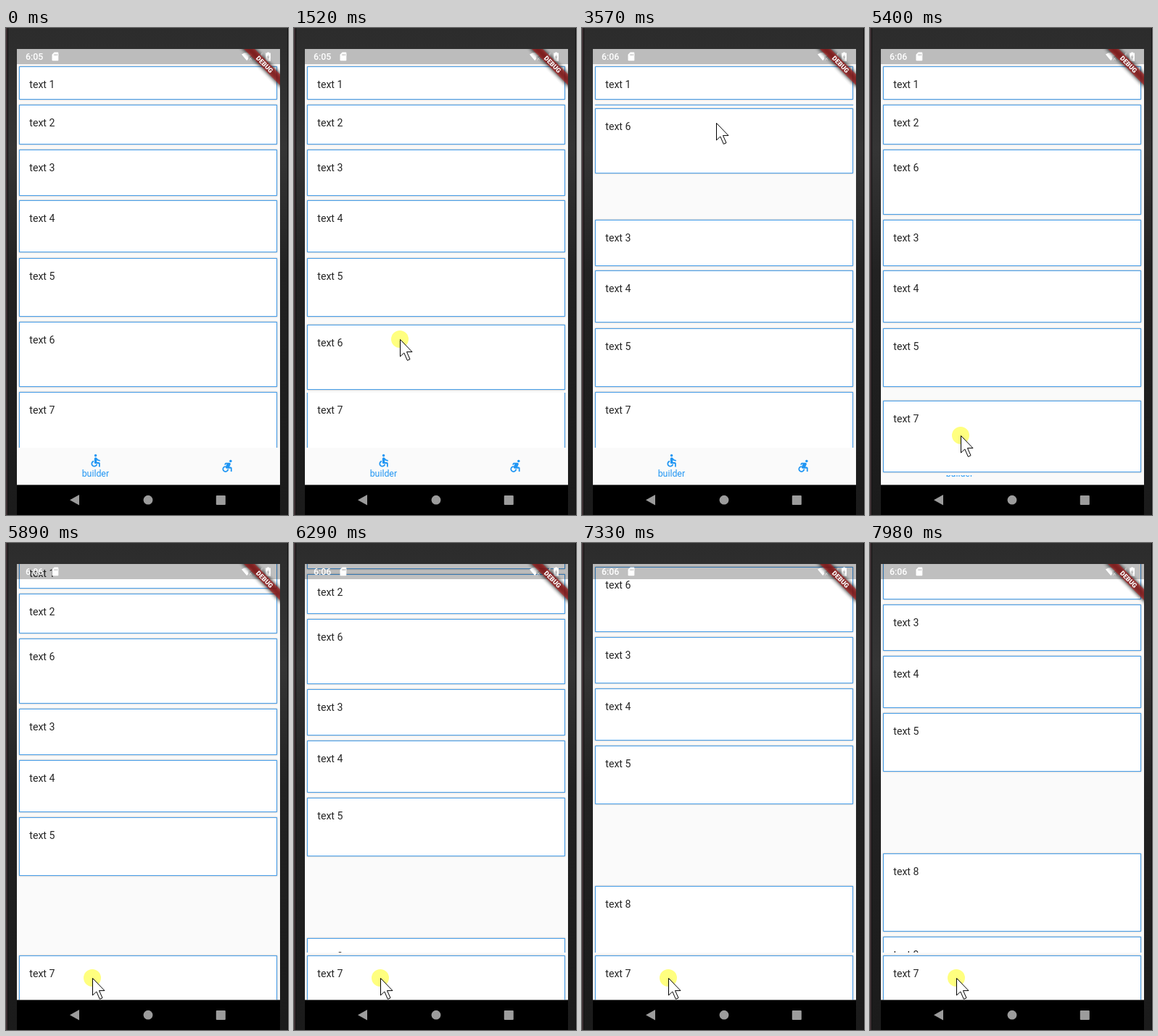
Recreate the animation shown at these times as an HTML page. Size 389 by 673 pixels, loop 8000 ms.

```html
<!DOCTYPE html>
<html lang="en">
<head>
<meta charset="utf-8">
<title>Reorderable list</title>
<style>
  html, body { margin: 0; width: 100%; height: 100%; overflow: hidden; background: #1e1e1e; }
  svg { display: block; width: 100vw; height: 100vh; font-family: Roboto, "Liberation Sans", sans-serif; }
  .face { fill: #fff; filter: drop-shadow(0 .9px .8px rgba(0, 0, 0, .32)); }
  .edge { fill: none; stroke: #489fea; }
  .label { font-size: 14.1px; fill: #262626; }
</style>
</head>
<body>
<svg id="stage" viewBox="0 0 389 673">
  <defs>
    <linearGradient id="bezel" x2="0" y2="1">
      <stop offset="0" stop-color="#2c2c2c"/>
      <stop offset=".25" stop-color="#353535"/>
      <stop offset=".5" stop-color="#222"/>
      <stop offset="1" stop-color="#1b1b1b"/>
    </linearGradient>
    <clipPath id="screen"><rect x="15" y="29" width="363" height="602.5"/></clipPath>
    <clipPath id="viewport"><rect x="15" y="29" width="363" height="551"/></clipPath>
    <filter id="blur" x="-30%" y="-100%" width="160%" height="300%"><feGaussianBlur stdDeviation="2.6"/></filter>
  </defs>

  <rect width="389" height="673" fill="url(#bezel)"/>
  <rect width="2" height="673" fill="#3d3033"/>
  <rect x="2" width="1" height="673" fill="#111"/>
  <rect x="388" width="1" height="673" fill="#111"/>

  <g clip-path="url(#screen)">
    <rect x="15" y="29" width="363" height="603" fill="#fafafa"/>
    <g id="list" clip-path="url(#viewport)"></g>

    <g fill="#2196f3">
      <rect x="15" y="580" width="363" height="52" fill="#fafafa"/>
      <g transform="translate(113 587.2) scale(.882)">
        <circle cx="12" cy="4" r="2"/>
        <path d="M19 13v-2c-1.54.02-3.09-.75-4.07-1.83l-1.29-1.43c-.17-.19-.38-.34-.61-.45-.01 0-.01-.01-.02-.01H13c-.35-.2-.75-.3-1.19-.26C10.76 7.11 10 8.04 10 9.09V15c0 1.1.9 2 2 2h5v5h2v-5.5c0-1.1-.9-2-2-2h-3v-3.45c1.29 1.07 3.25 1.94 5 1.95zm-6.17 5c-.41 1.16-1.52 2-2.83 2-1.66 0-3-1.34-3-3 0-1.31.84-2.41 2-2.83V12.1c-2.28.46-4 2.48-4 4.9 0 2.76 2.24 5 5 5 2.42 0 4.44-1.72 4.9-4h-2.07z"/>
      </g>
      <text x="123.4" y="620" font-size="12.35" text-anchor="middle">builder</text>
      <g transform="translate(294 594.6) scale(.882)">
        <circle cx="18" cy="4.54" r="2"/>
        <path d="M15 17h-2c0 1.65-1.35 3-3 3s-3-1.35-3-3 1.35-3 3-3v-2c-2.76 0-5 2.24-5 5s2.24 5 5 5 5-2.24 5-5zm3-3.5h-1.86l1.67-3.67C18.42 8.5 17.44 7 15.96 7h-5.2c-.81 0-1.54.47-1.87 1.2L8.22 10l1.92.53L10.79 9H12l-1.83 4.1c-.6 1.33.39 2.9 1.85 2.9H18v5h2v-5.5c0-1.1-.9-2-2-2z"/>
      </g>
    </g>

    <g id="lifted"></g>

    <rect x="15" y="29" width="363" height="21" opacity=".25"/>
    <g fill="#fff">
      <text id="clock" x="27" y="44.2" font-size="12.35" font-weight="500"></text>
      <path fill-rule="evenodd" d="M66.6 33.6H71.4Q72.3 33.6 72.3 34.5V44.3Q72.3 45.2 71.4 45.2H64.4Q63.5 45.2 63.5 44.3V36.8ZM66.3 36V38.2H67.3V36ZM68.1 36V38.2H69.1V36ZM69.9 36V38.2H70.9V36Z"/>
      <path d="M325 36.4Q332 31 339.4 36.4L337 39.4H334.4V42.4L332.2 45Z"/>
      <path d="M335.4 40.6l3.6 3.6m0-3.6l-3.6 3.6" stroke="#fff" stroke-width="1"/>
      <path d="M353.5 34V45.2H342.3Z"/>
      <path fill-rule="evenodd" d="M360.2 33.4H363V34.6H365V46H358.2V34.6H360.2ZM362.2 36.4L359.8 40.8H361.2V44L363.6 39.6H362.2Z"/>
    </g>

    <g transform="translate(378 29) rotate(45)">
      <rect x="-40" y="24.2" width="80" height="12" opacity=".8" filter="url(#blur)"/>
      <rect x="-40" y="24.7" width="80" height="10.6" fill="#b71c1c" fill-opacity=".6"/>
      <text y="33.2" font-size="9" font-weight="900" fill="#fff" text-anchor="middle">DEBUG</text>
    </g>
  </g>

  <rect x="15" y="631.5" width="363" height="41.5"/>
  <g fill="#9c9c9c">
    <path d="M88 652.3L101 645V659.6Z"/>
    <circle cx="196" cy="652.2" r="6.4"/>
    <rect x="289.8" y="646" width="13" height="13" rx="1"/>
  </g>

  <g id="pointer">
    <circle id="press" r="12" fill="#ff0" opacity=".5"/>
    <path d="M.5.5V24L5.8 19L10.4 29.4L14 27.7L9.5 17.6H17Z" fill="#fff" stroke="#000"/>
  </g>
</svg>

<script>
const LOOP = 8000;
const STEP = 128.5;            // screen refresh interval
const DP = 363 / 411.43;
const LIST_TOP = 50.1;
const MARGIN = 4 * DP;
const LAG = 95;                // a dragged card trails the pointer
const DROP = 3600, DROP_TIME = 230;
const SCROLL_START = 5400, SCROLL_SPEED = .07;

const clamp = v => Math.min(1, Math.max(0, v));
const mix = (a, b, p) => a + (b - a) * p;
const linear = p => p;
const easeOut = p => 1 - (1 - p) ** 2;
const between = (t, a, b) => t >= a && t < b;
const $ = id => document.getElementById(id);

const ENTRY = { x: 276, y: 645 };
const MOVES = [
  { at: 130, time: 300, x: 146, y: 430, ease: easeOut },
  { at: 1830, time: 1460, x: 185, y: 131, ease: linear },
  { at: 3830, time: 380, x: 128, y: 539, ease: easeOut },
  { at: 5255, time: 370, x: 119, y: 601, ease: linear }
];

function pointerAt(t) {
  return MOVES.reduce((pos, m) => {
    const p = m.ease(clamp((t - m.at) / m.time));
    return { x: mix(pos.x, m.x, p), y: mix(pos.y, m.y, p) };
  }, ENTRY);
}

const pitch = n => (50 + 10 * n) * DP;
const height = n => Math.round(pitch(n) - 2 * MARGIN);

function add(parent, name, attrs, text = "") {
  const el = document.createElementNS("http://www.w3.org/2000/svg", name);
  for (const key in attrs) el.setAttribute(key, attrs[key]);
  el.textContent = text;
  return parent.appendChild(el);
}

function makeCard(parent, n) {
  const g = add(parent, "g", {}), h = height(n);
  add(g, "rect", { x: 15, y: -4, width: 363, height: h + 8, fill: "#fafafa" });
  add(g, "rect", { class: "face", x: 18, y: 0, width: 356, height: h });
  add(g, "rect", { class: "edge", x: 18.5, y: .5, width: 355, height: h - 1 });
  add(g, "text", { class: "label", x: 32.3, y: 29.5 }, "text " + n);
  return g;
}

const place = (el, x, y) => el.setAttribute("transform", `translate(${x} ${y})`);
const show = (el, on) => el.setAttribute("display", on ? "inline" : "none");

const cards = [];
let edge = LIST_TOP + MARGIN;
for (let n = 1; n <= 10; n++) {
  cards.push({ n, top: edge, el: makeCard($("list"), n) });
  edge += pitch(n);
}
const slot = cards[2].top;
const lifted = [6, 7].map(n => ({ n, el: makeCard($("lifted"), n) }));

function draw(time) {
  const t = Math.floor((time + 40) / STEP) * STEP;
  const held = between(t, 1500, DROP + DROP_TIME) ? 6 : t >= 5000 ? 7 : 0;
  const scroll = SCROLL_SPEED * Math.max(0, t - SCROLL_START);
  const dragY = pointerAt(Math.min(t, DROP)).y;

  for (const { n, top, el } of cards) {
    let y = top;
    // Cards 3 to 5 make room as card 6 is dragged past them
    if (n > 2 && n < 6) y += pitch(6) * clamp((top + height(n) - dragY) / 40);
    if (n === 6 && t > DROP) y = slot;
    place(el, 0, Math.floor(y - scroll));
    show(el, n !== held);
  }

  const trail = pointerAt(t - LAG).y;
  const drop = easeOut(clamp((t - DROP) / DROP_TIME));
  for (const { n, el } of lifted) {
    const y = n === 6 ? mix(trail - 19.5, slot, drop) : trail - 31;
    place(el, 0, Math.floor(y));
    show(el, n === held);
  }

  const pos = pointerAt(t);
  place($("pointer"), Math.round(pos.x), Math.round(pos.y));
  show($("pointer"), t > 0);
  show($("press"), between(t, 740, 3570) || t >= 4480);
  $("clock").textContent = t < 2680 ? "6:05" : "6:06";
}

const start = performance.now();
function frame() {
  draw((performance.now() - start) % LOOP);
  requestAnimationFrame(frame);
}
draw(0);
requestAnimationFrame(frame);
</script>
</body>
</html>
```
